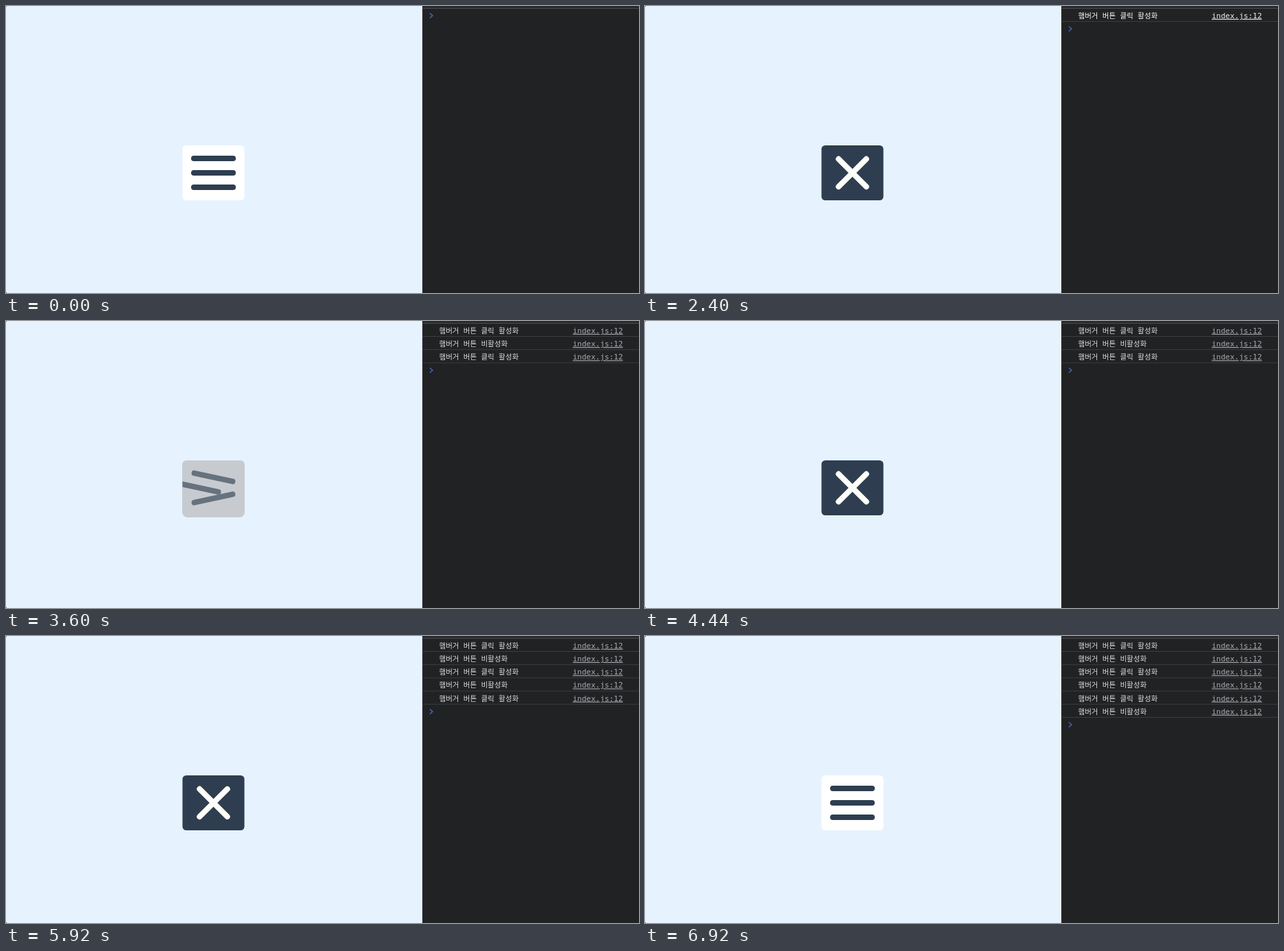
These frames come from a looping animation (920x418 px, 7520 ms). An HTML page:

```html
<!DOCTYPE html>
<html lang="ko">
<head>
<meta charset="utf-8">
<style>
  html, body { margin: 0; width: 100%; height: 100%; overflow: hidden; background: #e6f3ff; }
  svg { display: block; }
  text { font-family: "DejaVu Sans Mono", "Noto Sans CJK KR", "Noto Sans CJK", monospace; }
  .message { font-size: 10.5px; }
  .link { font-size: 11px; text-decoration: underline; }
</style>
</head>
<body>
<svg width="920" height="418" viewBox="0 0 920 418">
  <defs>
    <clipPath id="buttonClip"><rect x="256.5" y="203" width="90" height="80" rx="5.5"/></clipPath>
  </defs>
  <rect width="920" height="418" fill="#e6f3ff"/>
  <path d="M0 0h1v1h-1zM0 417h1v1h-1z" fill="#444b54"/>
  <rect id="shadow" x="256" y="203" width="91" height="83" rx="8"/>
  <rect id="button" x="256.5" y="203" width="90" height="80" rx="5.5"/>
  <g id="bars" clip-path="url(#buttonClip)"></g>
  <rect x="605" width="315" height="418" fill="#212224"/>
  <rect x="605" width="315" height="3" fill="#292a2d"/>
  <rect x="605" y="3" width="315" height="1" fill="#4b4c4f"/>
  <rect x="605" width="1" height="418" fill="#36383b"/>
  <g id="log"></g>
  <path id="prompt" d="M616 10.6l4 3.5l-4 3.5" fill="none" stroke="#4269bd" stroke-width="1.4"/>
</svg>
<script>
const LOOP = 7520, STEP = 40, DURATION = 500, ROW = 19.2;
const PAGE = [230, 243, 255], WHITE = [255, 255, 255], IVORY = [255, 255, 250], NAVY = [46, 62, 80];

// start: the easing begins; shown: the first moment it is seen
const CLICKS = [
  { start: 1352, shown: 1400 },
  { start: 2395, shown: 2440 },
  { start: 3506, shown: 3600 },
  { start: 4480, shown: 4600 },
  { start: 5440, shown: 5560 },
  { start: 6440, shown: 6560 }
];

const byId = id => document.getElementById(id);
const clamp = v => Math.max(0, Math.min(1, v));
const mix = (a, b, p) => a.map((v, i) => v + (b[i] - v) * p);
const css = c => `rgb(${c.map(Math.round)})`;

function add(parent, tag, attrs, text = "") {
  const el = document.createElementNS("http://www.w3.org/2000/svg", tag);
  for (const key in attrs) el.setAttribute(key, attrs[key]);
  el.textContent = text;
  return parent.appendChild(el);
}

// cubic-bezier(.25, .1, .25, 1)
function ease(x) {
  if (x <= 0 || x >= 1) return clamp(x);
  const curve = (a, b, s) => 3 * a * s * (1 - s) ** 2 + 3 * b * s * s * (1 - s) + s ** 3;
  let lo = 0, hi = 1;
  for (let i = 0; i < 24; i++) {
    const mid = (lo + hi) / 2;
    if (curve(.25, .25, mid) < x) lo = mid; else hi = mid;
  }
  return curve(.1, 1, lo);
}

const bars = [0, 1, 2].map(() =>
  add(byId("bars"), "rect", { x: -32.5, y: -4, width: 65, height: 8, rx: 4 }));

const rows = CLICKS.map((_, i) => {
  const row = add(byId("log"), "g", { transform: `translate(0 ${i * ROW})` });
  add(row, "text", { class: "message", x: 629.5, y: 17.8 },
    i % 2 ? "햄버거 버튼 비활성화" : "햄버거 버튼 클릭 활성화");
  add(row, "text", { class: "link", x: 823.7, y: 17.8 }, "index.js:12");
  add(row, "rect", { x: 606, y: 22, width: 314, height: 1, fill: "#3b3d40" });
  return row;
});

function openness(time, count) {
  if (!count) return 0;
  const p = ease((time - CLICKS[count - 1].start) / DURATION);
  return count % 2 ? p : 1 - p;
}

function drawButton(p) {
  let fill = mix(WHITE, NAVY, p);
  // The fill melts into the page where the two are nearly alike
  if (Math.hypot(...fill.map((v, i) => v - PAGE[i])) < 19) fill = PAGE;
  byId("button").setAttribute("fill", css(fill));
  byId("shadow").setAttribute("fill", css(fill));
  byId("shadow").setAttribute("opacity", clamp(1 - Math.abs(p - .27) * 6));

  const poses = [
    [0, 222 + 21 * p, 45 * p],
    [-78 * p, 243 - .6 * p, 45 * p],
    [0, 264 - 21 * p, -45 * p]
  ];
  bars.forEach((bar, i) => {
    const [dx, y, angle] = poses[i];
    bar.setAttribute("transform", `translate(${301.5 + dx} ${y}) rotate(${angle})`);
    bar.setAttribute("fill", css(mix(NAVY, IVORY, p)));
  });
}

function drawLog(time, count) {
  const bright = time < 3400 || (time >= 4600 && time < 5560);
  rows.forEach((row, i) => {
    row.style.display = i < count ? "" : "none";
    row.children[0].setAttribute("fill", bright ? "#fff" : "#dcdddf");
    row.children[1].setAttribute("fill", bright ? "#f0f0f0" : "#a9abae");
  });
  byId("prompt").setAttribute("transform", `translate(0 ${count * ROW})`);
}

function render(now) {
  const time = Math.floor((now % LOOP) / STEP) * STEP;
  const count = CLICKS.filter(click => time >= click.shown).length;
  drawButton(openness(time, count));
  drawLog(time, count);
}

const begin = performance.now();
function tick() {
  render(performance.now() - begin);
  requestAnimationFrame(tick);
}
tick();
</script>
</body>
</html>
```
